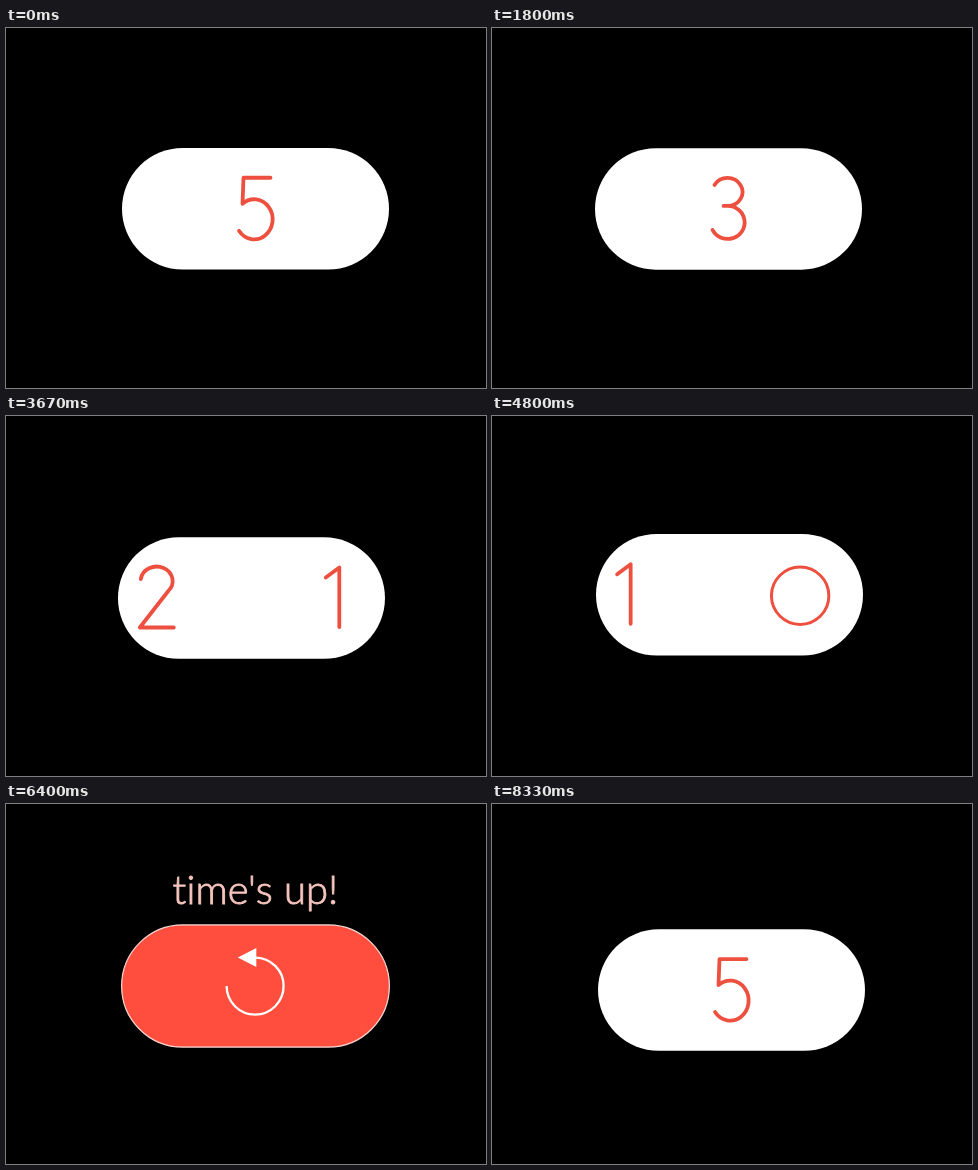
Recreate the animation shown at these times as an HTML page with a canvas. Size 480 px wide and 360 px high, loop 8.39 s.

```html
<!DOCTYPE html>
<html lang="en">
<head>
<meta charset="utf-8">
<title>Countdown</title>
<style>
  html, body { margin: 0; width: 100%; height: 100%; overflow: hidden; background: #000; }
  canvas { display: block; }
</style>
</head>
<body>
<canvas id="stage" width="480" height="360"></canvas>
<script>
const ctx = document.getElementById('stage').getContext('2d');
const LOOP = 8390, STEP = 200 / 3;
const RED = '#ff4e3d', INK = '#ee5040', WHITE = '#fff';
const PILL_W = 267, PILL_H = 121.5, SLIDE = 176;
const SLIDE_START = 56, SLIDE_EVERY = 1117, SLIDE_TIME = 500;

// Places the drifting pill passes through: time, left, top
const places = [
  [0, 116, 120], [1000, 100, 112.3], [2600, 106, 128], [4800, 104, 118],
  [6400, 116, 121.3], [7400, 98, 118], [8330, 106, 125.3]
];

// Digits 5 to 1, drawn around the pill centre
const glyphs = [
  'M15 -31H-12L-13 -5A18.5 20 0 1 1 -16.5 22',
  'M20 13.5H-20.5L8.5 -30.5V29.5',
  'M-14 -24A15 14 0 1 1 -1 -3H-5H-1A17 16.5 0 1 1 -16 21',
  'M-16 -19A16 14.5 0 1 1 11.5 -7L-17 29.5H17',
  'M-7 -20.5L6.5 -30.5V29'
].map(d => new Path2D(d));

const clamp = v => Math.min(1, Math.max(0, v));
const span = (t, start, length) => clamp((t - start) / length);
const easeInOut = u => u < 0.5 ? 2 * u * u : 1 - 2 * (1 - u) ** 2;
const easeOut = u => 1 - (1 - u) ** 3;

// Eases from place to place, swaying in whole half-waves on the way
function pillAt(t) {
  const i = Math.max(1, places.findIndex(p => p[0] > t));
  const last = t >= places.at(-1)[0];
  const [from, to] = last ? places.slice(-2) : places.slice(i - 1, i + 1);
  const length = to[0] - from[0], u = span(t, from[0], length);
  const sway = (k, middle, halfWave) => {
    const waves = Math.round(length / halfWave);
    return from[k] + (to[k] - from[k]) * u * u * (3 - 2 * u)
      + 7 * Math.sign(middle - from[k]) * Math.sin(Math.PI * u * waves);
  };
  return { x: sway(1, 98.5, 800) + PILL_W / 2, y: sway(2, 121, 400) + PILL_H / 2 };
}

function pillPath(grow = 0) {
  const w = PILL_W + grow, h = PILL_H + grow;
  ctx.beginPath();
  ctx.roundRect(-w / 2, -h / 2, w, h, h / 2);
}

function disc(r) {
  ctx.beginPath();
  ctx.arc(0, 0, r, 0, Math.PI * 2);
}

function drawGlyph(n, x) {
  ctx.save();
  ctx.translate(x, 0);
  ctx.strokeStyle = INK;
  ctx.lineCap = ctx.lineJoin = 'round';
  if (n < glyphs.length) {
    ctx.lineWidth = 3.8;
    ctx.stroke(glyphs[n]);
  } else {
    ctx.lineWidth = 3;
    ctx.translate(0, 1);
    disc(28.7);
    ctx.stroke();
  }
  ctx.restore();
}

function drawDigits(t) {
  if (t > 7000) return drawGlyph(0, 0);
  let pos = 0;
  for (let k = 0; k < 5; k++) {
    pos += easeInOut(span(t, SLIDE_START + k * SLIDE_EVERY, SLIDE_TIME));
  }
  for (let n = 0; n <= 5; n++) {
    if (Math.abs(n - pos) < 1) drawGlyph(n, (n - pos) * SLIDE);
  }
}

function drawReplay(open) {
  ctx.strokeStyle = ctx.fillStyle = WHITE;
  ctx.lineWidth = 2.3;
  ctx.lineCap = 'butt';
  ctx.beginPath();
  ctx.arc(-0.4, 0, 28.5, -Math.PI / 2, Math.PI * (1.5 - open / 2));
  ctx.stroke();
  ctx.beginPath();
  ctx.moveTo(0.8, -28.5 - 9.5 * open);
  ctx.lineTo(0.8 - 18.5 * open, -28.5);
  ctx.lineTo(0.8, -28.5 + 9.5 * open);
  ctx.fill();
}

function redRadius(t) {
  if (t < 7050) return 150 * easeInOut(span(t, 5130, 500));
  return 150 * (1 - span(t, 7050, 370)) ** 1.5;
}

function drawMessage(t) {
  if (t < 5030 || t > 7150) return;
  ctx.save();
  ctx.globalAlpha = 1 - span(t, 7000, 130);
  ctx.font = '300 40px Lato, "Open Sans", sans-serif';
  ctx.letterSpacing = '0.1px'; // keeps "t" and "i" from joining
  ctx.textAlign = 'center';
  ctx.fillStyle = ctx.strokeStyle = '#f5c5bd';
  ctx.lineWidth = 0.9;
  const y = -82 - 110 * (1 - easeOut(span(t, 5030, 600)));
  ctx.fillText("time's up!", 0, y);
  ctx.strokeText("time's up!", 0, y);
  ctx.restore();
}

function draw(t) {
  ctx.fillStyle = '#000';
  ctx.fillRect(0, 0, 480, 360);
  const { x, y } = pillAt(t);
  const r = redRadius(t);

  ctx.save();
  ctx.translate(x, y);
  ctx.save();
  pillPath();
  ctx.fillStyle = WHITE;
  ctx.fill();
  ctx.clip();
  drawDigits(t);
  if (r > 0) {
    disc(r);
    ctx.clip();
    ctx.fillStyle = RED;
    ctx.fill();
    drawReplay(easeInOut(span(t, 5500, 400)));
  }
  ctx.restore();
  if (r > 134) {
    pillPath(0.8);
    ctx.strokeStyle = '#ffd5d0';
    ctx.lineWidth = 1.2;
    ctx.stroke();
  }
  drawMessage(t);
  ctx.restore();
}

const began = performance.now();
function tick() {
  const t = (performance.now() - began) % LOOP;
  draw(Math.floor((t + 5) / STEP) * STEP);
  requestAnimationFrame(tick);
}
tick();
</script>
</body>
</html>
```
